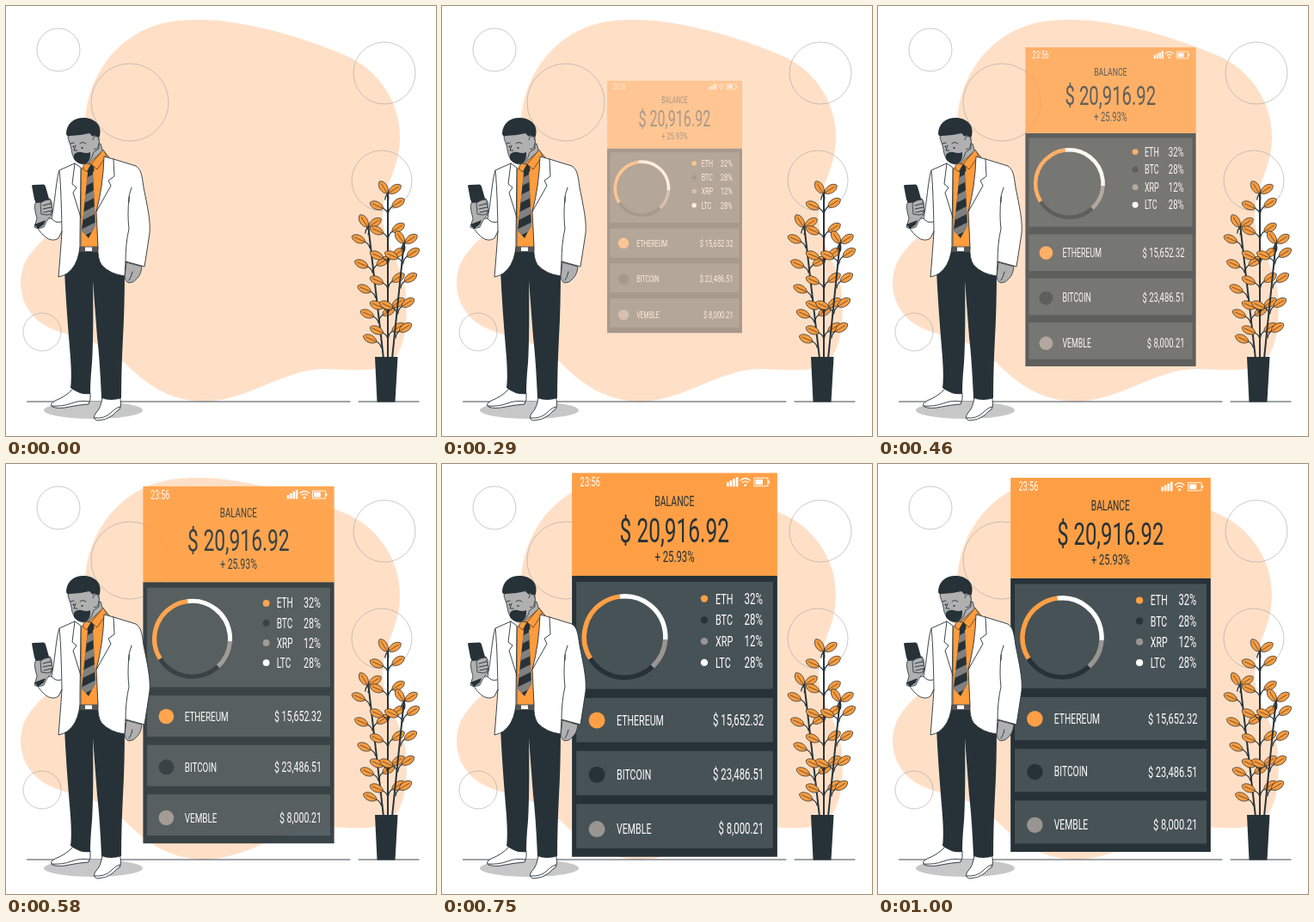
Animation, 500 px wide and 500 px high, one loop 1.04 s. Source, as an HTML page:

```html
<!DOCTYPE html>
<html lang="en">
<head>
<meta charset="utf-8">
<title>Wallet balance</title>
<style>
  html, body { margin: 0; width: 100%; height: 100%; overflow: hidden; background: #fff; }
  svg { display: block; width: 100%; height: 100%; }
  text { font-family: Roboto, "Liberation Sans", sans-serif; }
  #panel { transform-origin: 270.5px 233.5px; opacity: 0; }
  .line { fill: none; stroke: #263238; stroke-width: .9; stroke-linecap: round; stroke-linejoin: round; }
  .cloth { fill: #fff; stroke: #263238; stroke-width: .9; stroke-linejoin: round; }
  .skin { fill: #b0b0b0; stroke: #263238; stroke-width: .8; stroke-linejoin: round; }
  .shirt { fill: #ff9c3d; stroke: #263238; stroke-width: .7; stroke-linejoin: round; }
  .dark { fill: #263238; }
</style>
</head>
<body>
<svg viewBox="0 0 500 500">
  <path fill="#ffe0c7" d="M218 16C275 14 350 38 396 58C432 74 458 110 458 152C458 190 440 205 438 240C436 275 462 300 465 335C468 375 462 405 444 417C430 426 402 423 374 422C326 420 284 458 232 460C188 460 160 437 137 414C113 388 78 387 50 374C20 359 13 329 19 307C27 278 58 264 73 238C88 210 91 172 92 136C93 90 120 48 158 29C178 19 198 16 218 16Z"/>
  <g id="marks" fill="none" stroke="#999" stroke-opacity=".65" stroke-width=".8">
    <circle cx="61" cy="51" r="25"/>
    <circle cx="144" cy="112" r="45"/>
    <circle cx="440" cy="78" r="36"/>
    <circle cx="437" cy="203" r="35"/>
    <circle cx="42" cy="379" r="22"/>
  </g>
  <path class="line" d="M24.500 460H400M410 460H480"/>

  <g id="panel">
    <path fill="#263238" d="M151 130H390V457H151Z"/>
    <path fill="#ff9f45" d="M151 10H390V130H151Z"/>
    <g id="cards" fill="#475256"><path d="M156 137H385V261.500H156Z"/></g>
    <g id="ring" fill="none" stroke-width="5.500"></g>
    <g fill="#fff">
      <path d="M331 26v-5h2.700v5zM334.600 26v-7h2.700v7zM338.200 26v-9h2.700v9zM341.800 26v-11h2.700v11z"/>
      <circle cx="352.800" cy="24.500" r="1.500"/>
      <path fill="none" stroke="#fff" stroke-width="1.400" d="M347 19Q352.800 13.500 358.600 19M349.200 21.600Q352.800 18.200 356.400 21.600"/>
      <path fill="none" stroke="#fff" d="M363 16H379V25.500H363Z"/>
      <path d="M364.700 17.700H373V23.800H364.700ZM379.500 19H381V22.500H379.500Z"/>
    </g>
    <g id="words"></g>
  </g>

  <g id="plant"></g>

  <g id="man">
    <ellipse cx="101.500" cy="470" rx="57.500" ry="10" fill="#c7c7c7"/>
    <path class="cloth" d="M78 445L98 450Q99 458 96 463Q83 464 74 466Q61 469 54 466Q50 463 57 459Q70 454 78 445Z"/>
    <path class="cloth" d="M112 454L132 454Q135 463 132 469Q128 471 124 476Q116 482 106 482Q100 480 104 474Q111 467 112 454Z"/>
    <path class="line" d="M53 465Q66 466 76 462T97 460M103 479Q115 480 122 473T133 466"/>
    <path class="dark" d="M85 283H108L138 306Q138 350 136 385Q134 425 134 456Q122 460 111 456Q109 410 106 385L101 319Q102 380 100 415Q98 435 98 451Q87 453 75 444Q77 430 74 397Q70 350 68 308Z"/>

    <path class="skin" d="M90 166L110 160L114 174L100 188L92 184Z"/>
    <path class="shirt" d="M87 190L95 184L113 168L120 176L108 232L107 283L87 281Z"/>
    <path fill="#555" d="M86 279.500H107V286H86Z"/>
    <path fill="#fff" d="M92 280.500H100V285H92Z"/>
    <clipPath id="tie"><path d="M95 183L102 185L102.500 191L101 194L104 255L96 270L88 261L95 194L94 190Z"/></clipPath>
    <g clip-path="url(#tie)">
      <path class="dark" d="M85 180H108V272H85Z"/>
      <path stroke="#808080" stroke-width="8" d="M84 209L108 197M84 228L108 216M84 247L108 235M84 266L108 254"/>
    </g>
    <path class="shirt" d="M113 167L117 174L106 190L99 184ZM92 183L99 184L94 193L89 189Z"/>

    <path class="cloth" d="M80 183L62 191C58 203 57 228 53 247L47 247L36 257C43 268 52 276 61 270L65 262Q63 292 61 315Q73 313 80 301Q87 288 86 270L87 188Z"/>
    <path class="line" d="M62 192Q64 205 65 262M80 183L77 207L82 211L78 217L87 246M53 247Q57 253 64 251"/>
    <path class="cloth" d="M114 175L125 178L151 186C157 190 158 196 160 211C166 240 168 252 167 264Q164 284 161 303L139 297L138 314Q121 312 111 301Q106 293 107 280L105 239Q113 209 114 175Z"/>
    <path class="line" d="M143 222Q141 244 143 259Q139 276 139 298M125 178L126 198L119 203L122 209L105 239M146 211Q142 220 143 228"/>

    <path class="skin" d="M140 298L158 303Q157 312 153 316Q149 322 143 322Q139 321 138 315Z"/>
    <path class="line" d="M147 309Q146 315 143 319"/>
    <path class="skin" d="M35 227Q32 232 34 239L36 247L33 257Q37 260 44 257Q47 249 52 244Q55 239 53 235Q55 229 51 224L43 226Z"/>
    <path class="dark" d="M30 209Q30 208 32 208L44 207.500Q45.500 208 46 210L50 224Q49 228 46 228L36 229Q34 228 33 225ZM33 254L46 249L44 254L37 259Z"/>
    <path class="skin" d="M40 229Q45 225 51 225Q54 227 51 230Q55 231 53 234Q56 236 53 238Q54 242 48 243L41 242Z"/>
    <path class="line" d="M51 230L43 232M53 234L43 236M53 238L44 240"/>

    <path class="skin" d="M72 147Q71 154 75 162L77 172Q80 183 90 184Q99 182 102 170L108 166V147Z"/>
    <path class="dark" d="M70 149C70 136 80 129 92 130C104 131 112 139 109 151Q108 153 105 152Q103 149 101 152L97 148Q85 151 74 151Q71 152 70 149Z"/>
    <path class="skin" d="M101 156Q102 150 107 152Q110 157 107 164Q105 168 102 166"/>
    <path class="dark" d="M79 173Q82 169 88 170Q94 172 98 170Q99 179 93 183Q84 185 79 178Z"/>
    <path class="line" d="M75 160L79 159M86 160Q89 157 93 160M81 162L79 168L83 168"/>
    <circle class="dark" cx="78.500" cy="163.500" r="1"/>
    <circle class="dark" cx="88.500" cy="165" r="1.100"/>
  </g>
</svg>
<script>
const ns = 'http://www.w3.org/2000/svg';
const orange = '#ff9f45', dark = '#263238', grey = '#999591', white = '#fff';
const byId = id => document.getElementById(id);
const plant = byId('plant');

function add(parent, tag, attrs) {
  const el = document.createElementNS(ns, tag);
  for (const key in attrs) el.setAttribute(key, attrs[key]);
  parent.append(el);
  return el;
}

// One condensed setting serves all panel lettering.
function word(str, x, y, size, fill = white, anchor = 'start') {
  add(byId('words'), 'text', {
    transform: `translate(${x} ${y}) scale(.64 1)`,
    'font-size': size, fill, 'text-anchor': anchor
  }).textContent = str;
}

function dot(cx, cy, r, fill) {
  add(byId('words'), 'circle', { cx, cy, r, fill });
}

word('23:56', 160.5, 26, 14.8);
word('BALANCE', 270.3, 49.3, 16.4, dark, 'middle');
word('$ 20,916.92', 270.3, 90.5, 38.3, dark, 'middle');
word('+ 25.93%', 270.5, 114, 17.8, dark, 'middle');

// Legend rows and the ring arcs come from the same shares.
const shares = [['ETH', 32, orange], ['BTC', 28, dark], ['XRP', 12, grey], ['LTC', 28, white]];
let turn = -97;
shares.forEach(([code, share, color], i) => {
  const y = 156.5 + i * 24.8;
  dot(305, y, 4.2, color);
  word(code, 318, y + 6, 17);
  word(share + '%', 373, y + 6, 18, white, 'end');

  turn -= share * 3.6;
  add(byId('ring'), 'circle', {
    cx: 212.5, cy: 201, r: 47.3, stroke: color, pathLength: 100,
    'stroke-dasharray': `${share} ${100 - share}`,
    transform: `rotate(${turn} 212.5 201)`
  });
});

const coins = [['ETHEREUM', '15,652.32', orange], ['BITCOIN', '23,486.51', dark], ['VEMBLE', '8,000.21', grey]];
coins.forEach(([name, sum, color], i) => {
  const y = 298 + i * 63.4;
  add(byId('cards'), 'rect', { x: 156, y: 272 + i * 61.8, width: 229, height: 51.5 });
  dot(180, y, 9.5, color);
  word(name, 203, y + 5.6, 16.6);
  word('$ ' + sum, 374.3, y + 5.8, 17.8, white, 'end');
});

// A negative tilt mirrors the leaf so that it grows to the right.
function leaf(x, y, tilt) {
  const g = add(plant, 'g', {
    transform: `translate(${x} ${y}) rotate(${tilt}) scale(${tilt < 0 ? -1 : 1} 1)`
  });
  add(g, 'path', { d: 'M8 0Q13 0 16 4', class: 'line', style: 'stroke-width:1.3' });
  add(g, 'path', { d: 'M-8.5 0C-6 -6 5 -6 8.5 0C5 6 -6 6 -8.5 0Z', class: 'shirt' });
  add(g, 'path', { d: 'M-5 0H8', class: 'line', style: 'stroke-width:.6' });
}

// Leaves sit in rows down the stem; outer stems carry fewer on the inner side.
function stem(side, tipX, tipY) {
  const foot = 444 + side * 5, footY = 410;
  add(plant, 'path', { d: `M${foot} ${footY}L${tipX} ${tipY}`, class: 'line', style: 'stroke-width:2' });
  leaf(tipX - 5, tipY - 4, 58);
  leaf(tipX + 8, tipY - 2, -33);
  for (let y = tipY + 17, row = 0; y < 395; y += 29, row++) {
    const x = tipX + (foot - tipX) * (y - tipY) / (footY - tipY);
    if (side < 1 || row % 2 === 0) leaf(x - 13, y, 24);
    if (side > -1 || row % 2) leaf(x + 12, y - 3, -32);
  }
}
stem(-1, 421, 254);
stem(0, 444, 215);
stem(1, 463, 273);
add(plant, 'path', { d: 'M429 408H455.5L452.5 460.5H431.5Z', class: 'dark' });

// The panel grows and fades in at 24 steps a second, then shrinks back a little.
const loop = 1040, delay = 130, steps = 22, peak = 16.2;
const startOf = i => Math.floor((delay + i * 1000 / 24) / 10) * 10;

function pose(i, time) {
  const away = i < peak ? peak - i : (i - peak) * .68;
  return {
    offset: time / loop,
    opacity: Math.sin(Math.PI / 2 * Math.min(1, i / 15)),
    transform: `scale(${1.003 - .3825 * (1 - Math.cos(.121 * away))})`,
    easing: 'step-end'
  };
}

const poses = Array.from({ length: steps }, (_, i) => pose(i, startOf(i)));
byId('panel').animate(
  [pose(0, 0), ...poses, pose(steps - 1, loop)],
  { duration: loop, iterations: Infinity }
);
</script>
</body>
</html>
```
